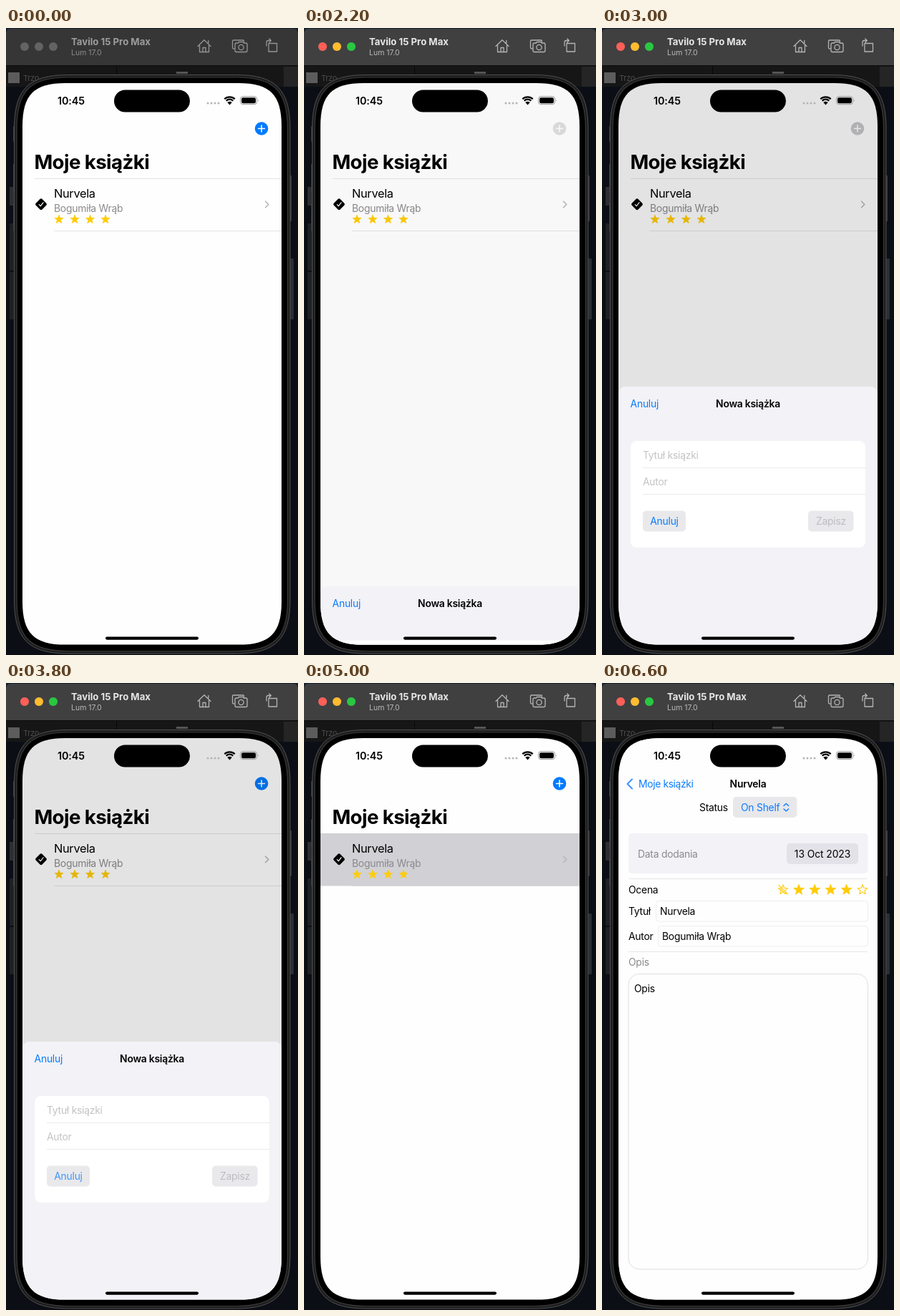
Animation, 408 px wide and 876 px high, one loop 8000 ms. Source, as an HTML page:

```html
<!DOCTYPE html>
<html lang="pl">
<head>
<meta charset="utf-8">
<title>Moje książki</title>
<style>
html, body { margin: 0; width: 100%; height: 100%; overflow: hidden; background: #0b0f15; }
svg { display: block; width: 100vw; height: 100vh; }
text { font-family: Inter, Roboto, sans-serif; white-space: pre; }
</style>
</head>
<body>
<svg id="stage" viewBox="0 0 408 876" preserveAspectRatio="xMidYMid meet"></svg>
<script>
const LOOP = 8000, STEP = 200;
const BLUE = '#0a7cff', GOLD = '#ffcc0a', BOOK = 'Nurvela', AUTHOR = 'Bogumiła Wrąb';

// Markup helpers
const rect = (x, y, w, h, r, fill, more = '') =>
  `<rect x="${x}" y="${y}" width="${w}" height="${h}" rx="${r}" fill="${fill}" ${more}/>`;
const line = (d, stroke, w = 1, more = '') =>
  `<path d="${d}" fill="none" stroke="${stroke}" stroke-width="${w}" stroke-linecap="round" stroke-linejoin="round" ${more}/>`;
const rule = (x1, x2, y, color) => rect(x1, y, x2 - x1, 1, 0, color);
const circle = (x, y, r, fill, more = '') => `<circle cx="${x}" cy="${y}" r="${r}" fill="${fill}" ${more}/>`;
const group = (id, body, more = '') => `<g id="${id}" ${more}>${body}</g>`;

// Rectangle with continuous-curvature corners
function squircle(x, y, w, h, r, more = '') {
  const e = 1.3 * r, c = 0.348 * r, right = x + w, low = y + h;
  return `<path d="M${x + e} ${y}H${right - e}C${right - c} ${y} ${right} ${y + c} ${right} ${y + e}
    V${low - e}C${right} ${low - c} ${right - c} ${low} ${right - e} ${low}
    H${x + e}C${x + c} ${low} ${x} ${low - c} ${x} ${low - e}
    V${y + e}C${x} ${y + c} ${x + c} ${y} ${x + e} ${y}Z" ${more}/>`;
}

// Text placed by the middle of its capitals
function text(x, y, str, { size = 13.9, fill = '#000', weight = 400, anchor = 'start', gap = -0.25, id = '' } = {}) {
  return `<text ${id && `id="${id}"`} x="${x}" y="${(y + size * 0.364).toFixed(2)}" font-size="${size}" fill="${fill}"
    font-weight="${weight}" text-anchor="${anchor}" letter-spacing="${gap}">${str}</text>`;
}

function star(x, y, r, fill = GOLD, more = `stroke="${GOLD}" stroke-width=".8"`) {
  const pts = Array.from({ length: 10 }, (_, i) => {
    const a = Math.PI * (i / 5 - 0.5), d = i % 2 ? r * 0.42 : r;
    return (x + d * Math.cos(a)).toFixed(2) + ',' + (y + d * Math.sin(a)).toFixed(2);
  });
  return `<polygon points="${pts.join(' ')}" fill="${fill}" stroke-linejoin="round" ${more}/>`;
}

function desktop() {
  return rect(0, 0, 408, 876, 0, '#0b0f15') +
    rect(0, 50, 408, 32, 0, '#161617') + rect(154, 54, 1, 28, 0, '#080808') +
    rect(388, 54, 20, 28, 0, '#252526') + rect(238, 61, 16, 3, 0, '#555') +
    rect(3, 62, 16, 15, 0, '#5c5c5c') + text(24, 70, 'Trzo', { size: 11, fill: '#4b4b4c' }) +
    rect(5, 222, 7, 26, 0, '#2c2e31') + rect(5, 273, 7, 66, 1, '#1e2125') +
    rect(5, 341, 7, 66, 1, '#1e2125') + rect(395, 322, 7, 85, 1, '#2b2e32');
}

function titleBar() {
  const lights = ['#ff5f57', '#febc2e', '#28c840'];
  const icon = '#b4b4b5';
  return rect(0, 0, 408, 4, 0, '#14202b') +
    `<path id="bar" d="M0 52V8Q0 1 7 1H401Q408 1 408 8V52Z"/>` +
    rule(0, 408, 52, '#0c0c0c') +
    group('idleLights', lights.map((_, i) => circle(26 + 20 * i, 26, 6, '#636364')).join('')) +
    group('lights', lights.map((c, i) => circle(26 + 20 * i, 26, 6, c)).join('')) +
    text(91, 19.5, 'Tavilo 15 Pro Max', { size: 13.2, weight: 700, gap: 0, id: 'device' }) +
    text(91, 34.5, 'Lum 17.0', { size: 10.5, gap: 0, id: 'system' }) +
    group('tools',
      line('M268 25.5L277 16.8L286 25.5M270.5 24V33.5H283.5V24M275 33.5V27.5H279V33.5M282.8 21V17.5', icon, 1.3) +
      line('M319 29H318Q316.5 29 316.5 27.5V18.5Q316.5 17 318 17H331Q332.5 17 332.5 18.5V19', icon, 1.3) +
      line('M322 21H324.2L325.5 19.5H331L332.3 21H335Q337 21 337 23V31.5Q337 33.5 335 33.5H322Q320 33.5 320 31.5V23Q320 21 322 21Z', icon, 1.3) +
      circle(328.5, 27, 3.6, 'none', `stroke="${icon}" stroke-width="1.3"`) +
      line('M367 21.5H378.5V33H367ZM364 25V20Q364 17.5 366.5 17.5H370M367.8 15L370.3 17.5L367.8 20', icon, 1.3));
}

function phone() {
  return rect(10, 137, 3, 22, 1, '#3a3a3b') + rect(10, 190, 3, 40, 1, '#3a3a3b') +
    rect(10, 244, 3, 40, 1, '#3a3a3b') + rect(396, 206, 3, 64, 1, '#3a3a3b') +
    squircle(11.5, 65.5, 385.5, 808.5, 58, 'fill="#1d1d1e" stroke="#505052"') +
    squircle(15, 69, 378.5, 801.5, 54.5, 'stroke="#39393a" stroke-width="1.2"');
}

function statusBar() {
  const arc = r => {
    const d = r * 0.707;
    return line(`M${312.5 - d} ${106.5 - d}A${r} ${r} 0 0 1 ${312.5 + d} ${106.5 - d}`, '#000', 2.3, 'style="stroke-linecap:butt"');
  };
  return text(91, 102, '10:45', { size: 14.4, weight: 600, anchor: 'middle', gap: -0.1 }) +
    rect(151, 86.5, 106, 31, 15.5, '#000') +
    [282, 287, 292, 297].map(x => circle(x, 105, 1.5, '#b5b5b7')).join('') +
    arc(10.2) + arc(6.8) + '<path d="M312.5 107.5L309.3 104A4.6 4.6 0 0 1 315.7 104Z"/>' +
    rect(327.5, 95.7, 23, 11, 3.4, 'none', 'stroke="#98989a"') + rect(329, 97.2, 20, 8, 2.2, '#000') +
    '<path d="M352 99.2Q353.8 101.2 352 103.2Z" fill="#98989a"/>';
}

function listPage() {
  return rect(23, 77, 362, 785, 0, '#fefefe') +
    rule(40, 385, 210, '#e4e4e6') + rule(67, 385, 283, '#e4e4e6') +
    rect(23, 210, 362, 73.5, 0, '#d1d1d5', 'id="mark"') +
    rect(42.8, 240, 12.4, 12.4, 2.2, '#000', 'transform="rotate(45 49 246.2)"') +
    line('M46.2 246.6L48.2 248.8L52 243.8', '#fff', 1.2) +
    text(67, 231, BOOK, { size: 16.4, gap: -0.35 }) +
    text(67, 252, AUTHOR, { fill: '#8a8a8e' }) +
    [74, 96, 117.5, 139].map(x => star(x, 267.5, 6.3)).join('') +
    line('M362.5 242.2L366.8 246.5L362.5 250.8', '#b6b6ba', 1.6);
}

function detailPage() {
  const field = (x, y, str) =>
    rect(x + 0.5, y + 0.5, 371 - x, 28.5, 4, '#fefefe', 'stroke="#eeeeef"') + text(x + 6, y + 15, str);
  return rect(23, 77, 362, 785, 0, '#fefefe') +
    text(136, 174, 'Status') + rect(183, 159, 89.5, 29, 5, '#e8e8eb') +
    text(194, 174, 'On Shelf', { fill: BLUE }) +
    line('M254 171.5L257.3 168.5L260.6 171.5M254 176L257.3 179L260.6 176', BLUE, 1.4) +
    rect(37, 210, 334.5, 56, 5, '#f2f2f7') + text(50, 239, 'Data dodania', { fill: '#8a8a8e' }) +
    rect(258, 224, 100, 29, 5, '#e2e2e8') + text(308, 239, '13 Oct 2023', { anchor: 'middle', gap: -0.1 }) +
    rule(37, 371, 273, '#e6e6e8') + text(37, 289, 'Ocena') +
    star(253, 289, 7, 'none', `stroke="${GOLD}" stroke-width="1.1"`) +
    line('M247 282.5L259.5 295M249.5 288L256 294.5', GOLD, 1.1) +
    [275, 297.2, 319.4, 341.6].map(x => star(x, 289, 7.8)).join('') +
    star(364, 289, 7.3, 'none', `stroke="${GOLD}" stroke-width="1.1"`) +
    text(37, 319, 'Tytuł') + field(75, 304, BOOK) +
    text(37, 354, 'Autor') + field(78, 339, AUTHOR) +
    rule(37, 371, 375, '#e6e6e8') + text(37, 389.5, 'Opis', { fill: '#8a8a8e' }) +
    rect(37, 406.5, 334.5, 412.5, 15, '#fefefe', 'stroke="#dedee0"') + text(45, 426.5, 'Opis');
}

// Drawn with its top edge at y = 0
function sheet() {
  const hint = '#c3c3c6';
  return rect(23, 0, 362, 420, 9, '#f2f2f7') +
    text(39.6, 24, 'Anuluj', { fill: BLUE }) +
    text(204, 24, 'Nowa książka', { weight: 600, anchor: 'middle' }) +
    rect(40, 76, 328, 149, 8.5, '#fff') +
    text(57, 96, 'Tytuł ksiązki', { fill: hint }) + rule(57, 368, 113, '#ebebed') +
    text(57, 133, 'Autor', { fill: hint }) + rule(57, 368, 150, '#ebebed') +
    rect(57, 173.5, 60, 29, 5, '#e9e9ec') +
    text(87, 188, 'Anuluj', { fill: BLUE, anchor: 'middle', id: 'cancel' }) +
    rect(288, 173.5, 63.5, 29, 5, '#e9e9ec') +
    text(320, 188, 'Zapisz', { fill: '#bdbdc1', anchor: 'middle' });
}

const stage = document.getElementById('stage');
stage.innerHTML =
  `<clipPath id="screen">${squircle(23, 77, 362, 784.6, 46.5)}</clipPath>` +
  desktop() + titleBar() + phone() +
  group('view',
    group('list', listPage()) +
    rect(23, 77, 362, 785, 0, '#000', 'id="shade"') +
    group('detail', detailPage()) +
    text(0, 0, 'Moje książki', { size: 27.7, weight: 700, gap: -0.6, id: 'bigTitle' }) +
    text(0, 0, 'Moje książki', { fill: BLUE, gap: -0.37, id: 'backTitle' }) +
    line('M42 134.5L35.5 141L42 147.5', BLUE, 2.1, 'id="back"') +
    text(204, 141, BOOK, { weight: 600, anchor: 'middle', id: 'navTitle' }) +
    group('save', rect(305, 126, 63, 29.5, 5, BLUE) + text(336.5, 141, 'Zapisz', { fill: '#fff', anchor: 'middle' })) +
    group('add', circle(357, 140.5, 9.3, BLUE, 'id="addDisc"') + line('M352.5 140.5H361.5M357 136V145', '#fff', 1.6)) +
    rect(23, 77, 362, 785, 0, '#000', 'id="dim"') +
    group('sheet', sheet()) +
    statusBar() + rect(139, 850.5, 130, 4.2, 2.1, '#000'),
    'clip-path="url(#screen)"');

const set = (id, attrs) => {
  const el = document.getElementById(id);
  for (const k in attrs) el.setAttribute(k, attrs[k]);
};
const clamp = v => Math.min(1, Math.max(0, v));
const mix = (a, b, p) => a + (b - a) * p;

// Critically damped spring from 0 to 1
function spring(t, start, speed) {
  const x = Math.max(0, t - start) / 1000 * speed;
  return 1 - (1 + x) * Math.exp(-x);
}

function render(t) {
  const active = t >= 800;
  set('bar', { fill: active ? '#404041' : '#363636' });
  set('lights', { opacity: +active });
  set('device', { fill: active ? '#e6e6e6' : '#9c9c9c' });
  set('system', { fill: active ? '#b9b9b9' : '#8b8b8b' });
  set('tools', { opacity: active ? 1 : 0.75 });

  // Sheet rises and leaves
  const up = spring(t, 2160.5, 22.8) - spring(t, 4360.5, 22.8);
  set('sheet', { transform: `translate(0 ${mix(862, 501, up).toFixed(2)})`, opacity: +(up > 0.001) });
  set('dim', { opacity: 0.105 * up });
  set('cancel', { opacity: t >= 3800 ? 0.75 : 1 });

  // Detail page pushes the list aside
  const push = spring(t, 5770, 17.6);
  const shown = push > 0;
  set('mark', { opacity: +(t >= 5000) });
  set('list', { transform: `translate(${(-108.6 * push).toFixed(2)} 0)` });
  set('shade', { opacity: 0.1 * push });
  set('detail', { transform: `translate(${(362 * (1 - push)).toFixed(2)} 0)`, opacity: +shown });

  const x = mix(39.4, 51, push), y = mix(187, 141, push), scale = mix(2.09, 1, push);
  const place = s => `translate(${x} ${y}) scale(${s})`;
  set('bigTitle', { transform: place(scale / 2.09), opacity: clamp(1 - 2 * push) });
  set('backTitle', { transform: place(scale), opacity: clamp(2 * push) });
  set('back', { opacity: clamp((push - 0.9) * 8), transform: `translate(${(1 - push) * 60} ${y - 141})` });
  set('navTitle', { opacity: +(t >= 6200) });
  set('save', { opacity: shown ? clamp((6400 - t) / 400) : 0 });

  const held = t >= 2000 && t < 2200;
  const grey = t >= 2200 && t < 3800;
  set('add', { opacity: held ? 0.35 : clamp(1 - 1.5 * push) });
  set('addDisc', { fill: grey ? (t < 2400 ? '#dcdfdb' : '#c6c6c9') : '#007aff' });
}

const began = performance.now();
let last = -1;
function tick(now) {
  const t = Math.floor((Math.max(0, now - began) % LOOP) / STEP) * STEP;
  if (t !== last) render(last = t);
  requestAnimationFrame(tick);
}
render(0);
requestAnimationFrame(tick);
</script>
</body>
</html>
```
